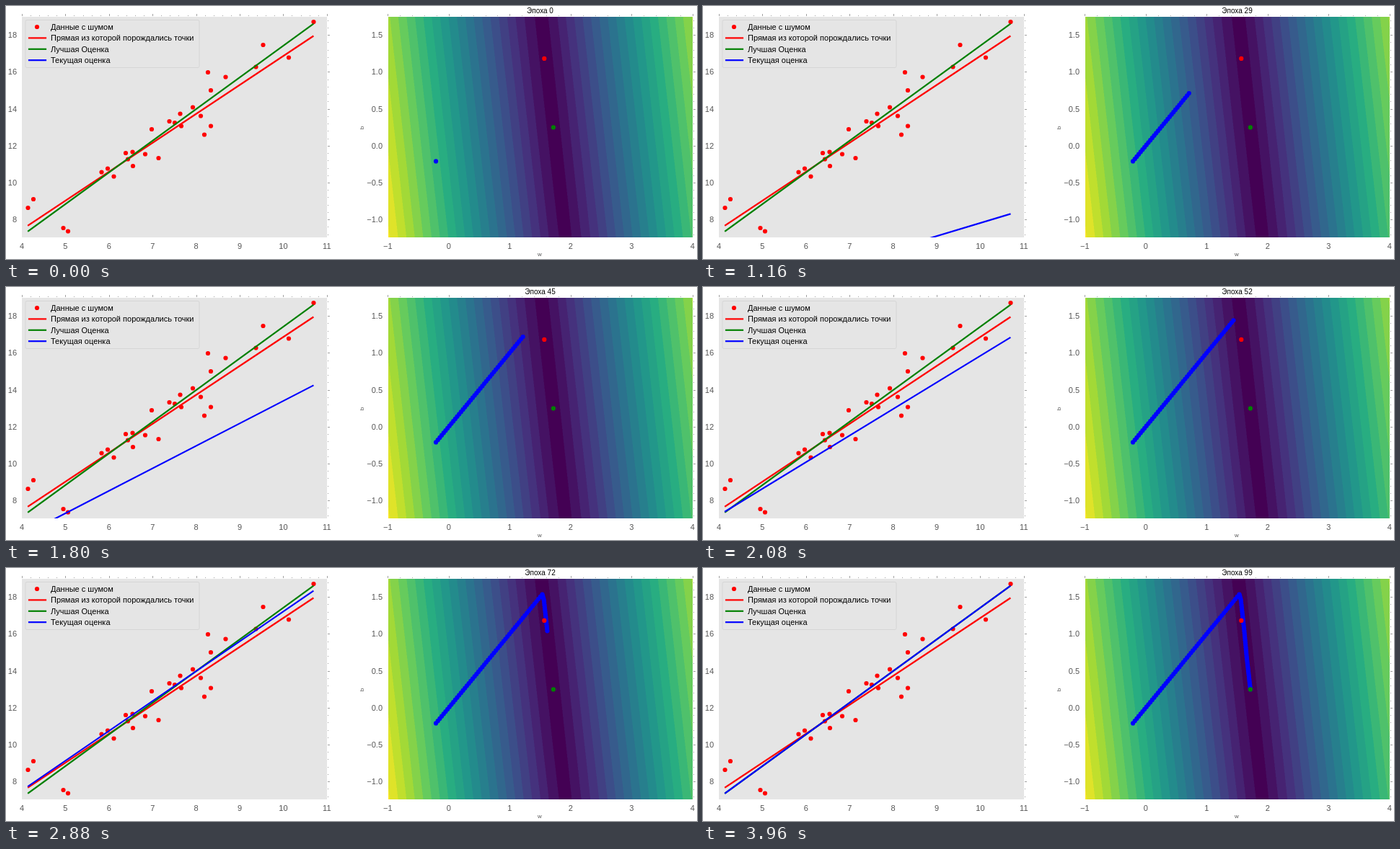
Recreate the animation shown at these times as an HTML page with a canvas. Size 958 px wide and 351 px high, loop 4000 ms.

```html
<!DOCTYPE html>
<html lang="ru">
<head>
<meta charset="utf-8">
<style>
html, body { margin: 0; width: 100%; height: 100%; overflow: hidden; background: #fff; }
canvas { display: block; }
</style>
</head>
<body>
<canvas id="stage" width="958" height="351"></canvas>
<script>
const ctx = document.getElementById('stage').getContext('2d');
const STEP = 40, EPOCHS = 100, TOP = 15, HEIGHT = 306, BOTTOM = TOP + HEIGHT;
const RED = '#ff0000', GREEN = '#008000', BLUE = '#0000ff';
const FONT = '"Liberation Sans", Arial, sans-serif';

const fit = { left: 22, width: 423, x: v => 22 + (v - 4) * 60.4, y: v => 296.2 - (v - 8) * 25.6 };
const loss = { left: 529.5, width: 422.5, x: v => 613.8 + v * 84.5, y: v => 193.9 - v * 102.5 };

const points = [[30.5, 280], [38, 268], [79.5, 308], [86, 312.5], [132.5, 230.5], [141, 225.5],
  [149.5, 236.5], [166, 204], [169, 212.5], [175.5, 202.5], [176, 222], [193, 205.5], [202, 171],
  [211.5, 211], [226.5, 160], [234, 162], [241.5, 149.5], [243, 166.5], [259, 140.5], [270, 152.5],
  [275, 178.5], [280, 92], [284, 117], [284, 166.5], [304.5, 98.5], [346.5, 84.5], [356.5, 54],
  [392, 71.5], [426.5, 22]];
const samples = points.map(([x, y]) => [4 + (x - 22) / 60.4, 8 + (296.2 - y) / 25.6]);

const trueLine = [1.568, 1.18], bestLine = [1.717, 0.249];
// epoch, w, b
const track = [[0, -0.21, -0.21], [55, 1.535, 1.535], [59, 1.562, 1.455],
  [72, 1.617, 1.04], [83, 1.656, 0.69], [99, 1.717, 0.249]];

function estimate(epoch) {
  const i = Math.max(1, track.findIndex(k => k[0] >= epoch));
  const [e0, w0, b0] = track[i - 1], [e1, w1, b1] = track[i];
  const t = (epoch - e0) / (e1 - e0);
  return [w0 + (w1 - w0) * t, b0 + (b1 - b0) * t];
}

const viridis = [[68, 1, 84], [71, 45, 123], [59, 82, 139], [44, 114, 142], [33, 145, 140],
  [40, 174, 128], [94, 201, 98], [173, 220, 48], [253, 231, 37]];
function shade(t) {
  const p = Math.min(1, t) * 8, i = Math.min(7, Math.floor(p));
  return viridis[i].map((c, k) => c + (viridis[i + 1][k] - c) * (p - i));
}

function meanError(w, b) {
  let sum = 0;
  for (const [x, y] of samples) sum += Math.abs(y - w * x - b);
  return sum / samples.length;
}

function contours() {
  const scale = 2, map = document.createElement('canvas');
  map.width = loss.width * scale;
  map.height = HEIGHT * scale;
  const c = map.getContext('2d'), img = c.createImageData(map.width, map.height);
  const bands = Array.from({ length: 22 }, (_, i) => shade(i / 21));
  for (let j = 0, n = 0; j < map.height; j++) {
    const b = (193.9 - TOP - j / scale) / 102.5;
    for (let i = 0; i < map.width; i++, n += 4) {
      const w = (loss.left + i / scale - 613.8) / 84.5;
      img.data.set([...bands[Math.min(21, Math.floor(meanError(w, b)))], 255], n);
    }
  }
  c.putImageData(img, 0, 0);
  return map;
}

function text(g, str, x, y, size, color = '#555', align = 'center') {
  g.font = `${size}px ${FONT}`;
  g.fillStyle = color;
  g.textAlign = align;
  g.textBaseline = 'alphabetic';
  g.fillText(str, x, y);
}

function dot(g, x, y, color) {
  g.fillStyle = color;
  g.beginPath();
  g.arc(x, y, 3.1, 0, 7);
  g.fill();
}

function stroke(g, x0, y0, x1, y1, color, width = 2.2) {
  g.strokeStyle = color;
  g.lineWidth = width;
  g.lineCap = width > 1 ? 'square' : 'butt';
  g.beginPath();
  g.moveTo(x0, y0);
  g.lineTo(x1, y1);
  g.stroke();
}

function regression(g, [w, b], color) {
  stroke(g, fit.x(4.15), fit.y(w * 4.15 + b), fit.x(10.68), fit.y(w * 10.68 + b), color);
}

function ticks(g, ax, from, to, step, yFrom, yTo, yStep) {
  const right = ax.left + ax.width;
  for (let i = Math.round(from / step); i <= Math.round(to / step); i++) {
    const x = Math.round(ax.x(i * step)) + 0.5, major = i % 5 === 0;
    stroke(g, x, TOP - (major ? 4 : 2), x, TOP - 1, '#777', 0.7);
  }
  for (let i = Math.round(yFrom / yStep); i <= Math.round(yTo / yStep); i++) {
    const y = Math.round(ax.y(i * yStep)) + 0.5, major = i % 5 === 0;
    stroke(g, right + 1, y, right + (major ? 4 : 2), y, '#777', 0.7);
  }
}

function layer(draw) {
  const c = document.createElement('canvas');
  c.width = 958;
  c.height = 351;
  draw(c.getContext('2d'));
  return c;
}

const backdrop = layer(g => {
  g.fillStyle = '#fff';
  g.fillRect(0, 0, 958, 351);
  g.fillStyle = '#e5e5e5';
  g.fillRect(fit.left, TOP, fit.width, HEIGHT);
  g.drawImage(contours(), loss.left, TOP, loss.width, HEIGHT);
  ticks(g, fit, 4, 11, 0.2, 7.2, 18.8, 0.4);
  ticks(g, loss, -1, 4, 0.2, -1.2, 1.7, 0.1);
  for (let v = 4; v <= 11; v++) text(g, v, fit.x(v), 337, 11);
  for (let v = 8; v <= 18; v += 2) text(g, v, 15, fit.y(v) + 4, 11, '#555', 'right');
  for (let v = -1; v <= 4; v++) text(g, String(v).replace('-', '−'), loss.x(v), 337, 11);
  for (let v = -1; v <= 1.5; v += 0.5)
    text(g, v.toFixed(1).replace('-', '−'), 522, loss.y(v) + 4, 11, '#555', 'right');
  text(g, 'w', 740, 347, 8);
  g.save();
  g.translate(496, 169);
  g.rotate(-Math.PI / 2);
  text(g, 'b', 0, 0, 8);
  g.restore();
  points.forEach(([x, y]) => dot(g, x, y, RED));
  regression(g, trueLine, RED);
  regression(g, bestLine, GREEN);
});

const legend = layer(g => {
  g.beginPath();
  g.roundRect(27, 19.5, 241, 66, 2);
  g.fillStyle = 'rgba(229,229,229,.8)';
  g.fill();
  g.strokeStyle = '#d2d2d2';
  g.lineWidth = 0.8;
  g.stroke();
  [['Данные с шумом'], ['Прямая из которой порождались точки', RED],
    ['Лучшая Оценка', GREEN], ['Текущая оценка', BLUE]].forEach(([label, color], i) => {
    const y = 29 + i * 15.4;
    if (color) stroke(g, 32, y, 55, y, color);
    else dot(g, 43, y, RED);
    text(g, label, 62, y + 4, 11, '#000', 'left');
  });
});

function render(ms) {
  const epoch = Math.floor(ms / STEP) % EPOCHS;
  ctx.drawImage(backdrop, 0, 0);
  ctx.save();
  ctx.beginPath();
  ctx.rect(fit.left, TOP, fit.width, HEIGHT);
  ctx.clip();
  regression(ctx, estimate(epoch), BLUE);
  ctx.restore();
  ctx.drawImage(legend, 0, 0);
  for (let e = 0; e <= epoch; e++) {
    const [w, b] = estimate(e);
    dot(ctx, loss.x(w), loss.y(b), BLUE);
  }
  dot(ctx, loss.x(trueLine[0]), loss.y(trueLine[1]), RED);
  dot(ctx, loss.x(bestLine[0]), loss.y(bestLine[1]), GREEN);
  text(ctx, 'Эпоха ' + epoch, 740.5, 9.5, 10, '#000');
}

const start = performance.now();
function frame() {
  render(performance.now() - start);
  requestAnimationFrame(frame);
}
frame();
</script>
</body>
</html>
```
